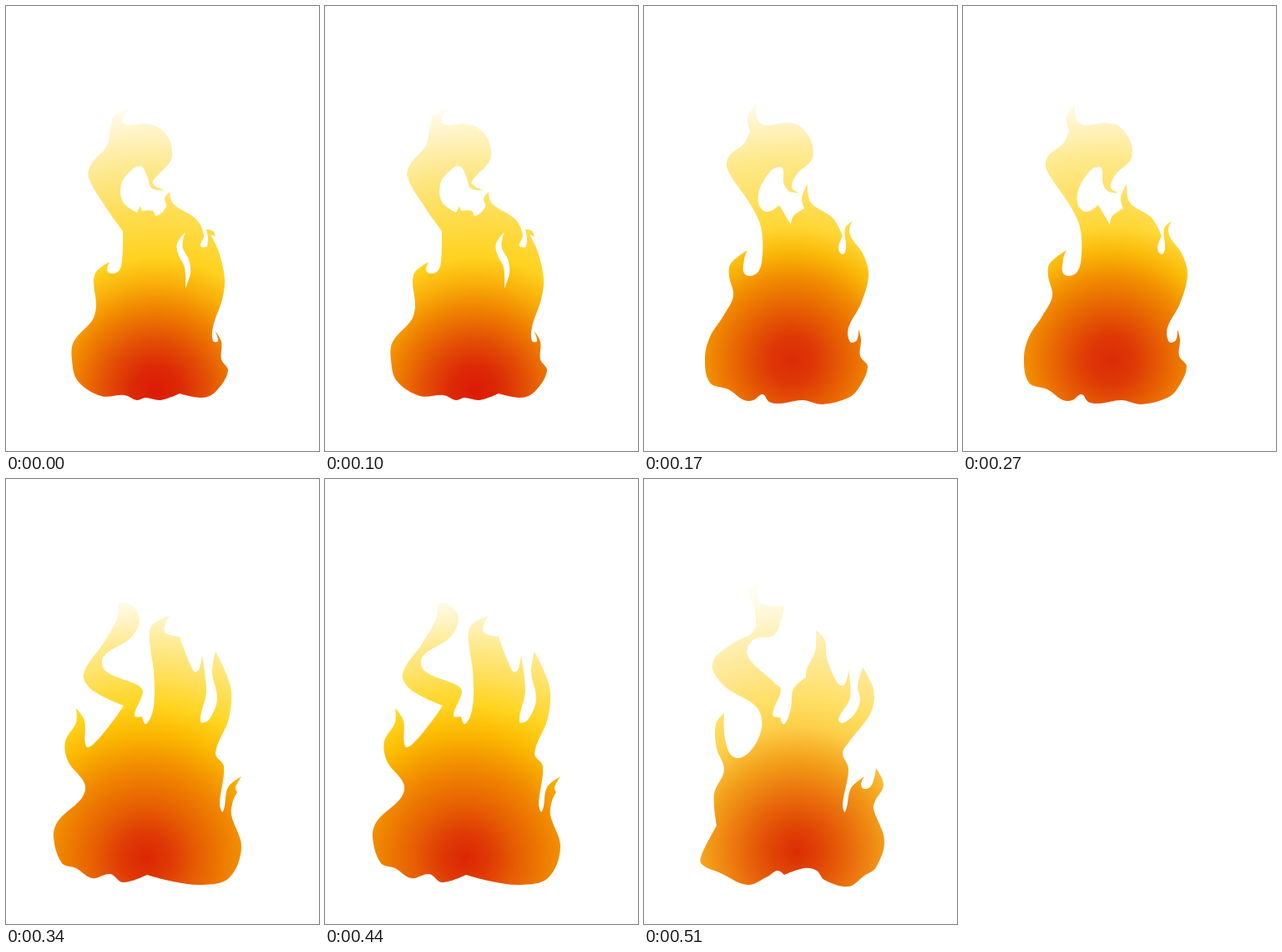
An HTML page for the animation above (680 ms loop, 375 by 534 pixels).

```html
<!DOCTYPE html>
<html lang="en">
<head>
<meta charset="utf-8">
<title>Flame</title>
<style>
  html, body { margin: 0; width: 100%; height: 100%; overflow: hidden; background: #fff; }
  svg { display: block; width: 100%; height: 100%; }
</style>
</head>
<body>
<svg id="stage" viewBox="0 0 375 534"></svg>
<script>
const HOLD = 170;

// Outlines are points on the edge; a star marks a sharp corner.
// Glow stops are "radius colour" around the hot centre.
const poses = [
  {
    centre: [180, 462],
    glow: '0 #dc1a06,30 #dc2a06,60 #e34d05,100 #f08400,130 #f9b00a,160 #ffd21f,210 #fedc4d,260 #fde684,310 #fff3c4,342 #fffdf4',
    shapes: [
      `150,122* 130,131 126,142 121,167 102,190 99,206 122,245 140,270* 139,306 134,319 122,319
       124,307* 108,319 105,332 108,358 104,376 81,403 79,425 86,450 114,468 142,467 157,473
       167,470 185,473 208,465* 235,470 251,463 266,438 258,424 258,403 250,389* 254,402 248,402
       248,385 259,352 262,328 255,295 245,274* 251,277* 248,270 240,268* 242,279 241,289* 233,288
       237,275 228,256 200,237 196,223* 190,231 192,241 180,252 176,246 163,246* 161,240* 157,248*
       140,235 138,214 147,200 161,192 169,204 175,219 190,221* 176,213 182,203 198,184 196,161
       183,146 165,141 147,143 139,137`,
      `215,271* 205,285 206,297 214,314 215,339* 221,320 219,304 212,291 212,281`
    ]
  },
  {
    centre: [177, 425],
    glow: '0 #dc2a08,30 #de3a06,60 #e65c03,100 #f18c00,130 #fab808,160 #ffd633,200 #fee066,245 #fee98c,280 #fff2bf,310 #fffbe8',
    shapes: [
      `134,117* 124,133 127,150* 120,165 102,180 100,196 128,239 140,265 142,298 136,320 121,322
       120,304 124,293* 104,309 102,324 107,348 95,372 79,397 73,422 79,452 101,460 120,473 131,473
       142,466 150,475 163,477 190,473 214,478 245,470 257,459 268,433 259,420 260,400 257,388*
       255,401 247,403 245,386 260,357 269,322 262,297 249,279 246,268 250,258* 241,267 242,290
       238,298 233,290 238,276* 226,254 200,236 196,213* 189,230 192,243* 179,252 176,262* 162,239*
       147,247 137,236 142,212 163,193 168,214 175,223 186,224* 177,218 183,202 201,184 201,164
       188,145 172,140 145,143 136,136`
    ]
  },
  {
    centre: [168, 455],
    glow: '0 #dc2606,30 #df3a05,60 #e65c03,110 #f18b00,150 #fbb800,185 #ffd520,220 #fedf59,255 #fee98c,290 #fff5cc,312 #fffcf0',
    shapes: [
      `135,148* 133,168 116,198 93,234 103,253 141,272* 130,288 105,318 96,321 94,290 84,275* 84,292
       71,315 74,338 95,373 62,411 57,430 67,461 84,467 103,479 125,474 140,484 169,475* 200,483
       235,487 267,479 282,442 270,403 272,386 277,376* 275,370 282,357* 266,370 260,399 256,390
       261,345 251,329 267,287 269,249 251,207* 247,232 253,264 243,289 233,291 240,255 235,211*
       231,229 225,231 208,189* 190,183 196,164* 174,177 173,203 177,230 177,272 168,294 163,285*
       154,284 164,256 159,248 119,230 117,213 150,190 160,168 151,152`
    ]
  },
  {
    centre: [183, 447],
    glow: '0 #dc2c05,30 #e04505,60 #e8650a,110 #f3a01a,150 #fdcf49,180 #ffde62,220 #fee68c,250 #fdeda8,295 #fff9e0,325 #fffefa',
    shapes: [
      `142,124* 125,131 133,157 131,183 108,196 82,221 96,248 135,274 141,298 127,327 108,334 97,312
       96,281* 86,294 87,323 96,349 84,378 87,416* 69,451 69,462 92,473 124,487 148,477 160,470
       168,475* 192,467 207,470 216,481 245,489 264,476 278,466 288,434 275,396 277,386 287,367
       278,347* 273,367 264,372 260,366 264,357* 248,371 241,399 238,390 245,348 238,329 246,315
       272,280 275,253 262,226* 256,249 259,265 253,281 238,293 233,288 247,262 245,229* 240,247
       232,245 219,215 217,194 206,181* 205,207 195,228 194,238* 179,252 176,275 168,294 163,286*
       154,283 164,253 157,245 124,212 131,193 157,186 168,152* 150,152 138,147 136,135`
    ]
  }
];

const stage = document.getElementById('stage');

function add(parent, tag, attrs) {
  const node = document.createElementNS('http://www.w3.org/2000/svg', tag);
  for (const key in attrs) node.setAttribute(key, attrs[key]);
  return parent.appendChild(node);
}

// Smooth closed curve through the points
function outline(text) {
  const pts = text.trim().split(/\s+/).map(word => {
    const [x, y] = word.split(',').map(parseFloat);
    return { x, y, sharp: word.endsWith('*') };
  });
  const n = pts.length;
  const handle = (i, reach) => {
    const p = pts[i];
    if (p.sharp) return `${p.x} ${p.y}`;
    const a = pts[(i + n - 1) % n], b = pts[(i + 1) % n];
    const k = reach / (Math.hypot(b.x - a.x, b.y - a.y) || 1);
    return `${(p.x + (b.x - a.x) * k).toFixed(2)} ${(p.y + (b.y - a.y) * k).toFixed(2)}`;
  };
  let d = `M${pts[0].x} ${pts[0].y}`;
  pts.forEach((p, i) => {
    const j = (i + 1) % n, q = pts[j];
    const reach = Math.hypot(q.x - p.x, q.y - p.y) / 3;
    d += `C${handle(i, reach)} ${handle(j, -reach)} ${q.x} ${q.y}`;
  });
  return d + 'Z';
}

const loop = HOLD * poses.length;

poses.forEach(({ centre: [cx, cy], glow, shapes }, i) => {
  const stops = glow.split(',').map(s => s.split(' '));
  const r = +stops[stops.length - 1][0];
  const fill = add(stage, 'radialGradient', { id: 'glow' + i, gradientUnits: 'userSpaceOnUse', cx, cy, r });
  stops.forEach(([at, color]) => add(fill, 'stop', { offset: at / r, 'stop-color': color }));

  const flame = add(stage, 'path', {
    d: shapes.map(outline).join(''),
    fill: `url(#glow${i})`,
    'fill-rule': 'evenodd'
  });
  flame.animate([
    { opacity: 1, offset: 0, easing: 'step-end' },
    { opacity: 0, offset: 1 / poses.length, easing: 'step-end' },
    { opacity: 0, offset: 1 }
  ], { duration: loop, delay: i * HOLD - loop, iterations: Infinity });
});
</script>
</body>
</html>
```
